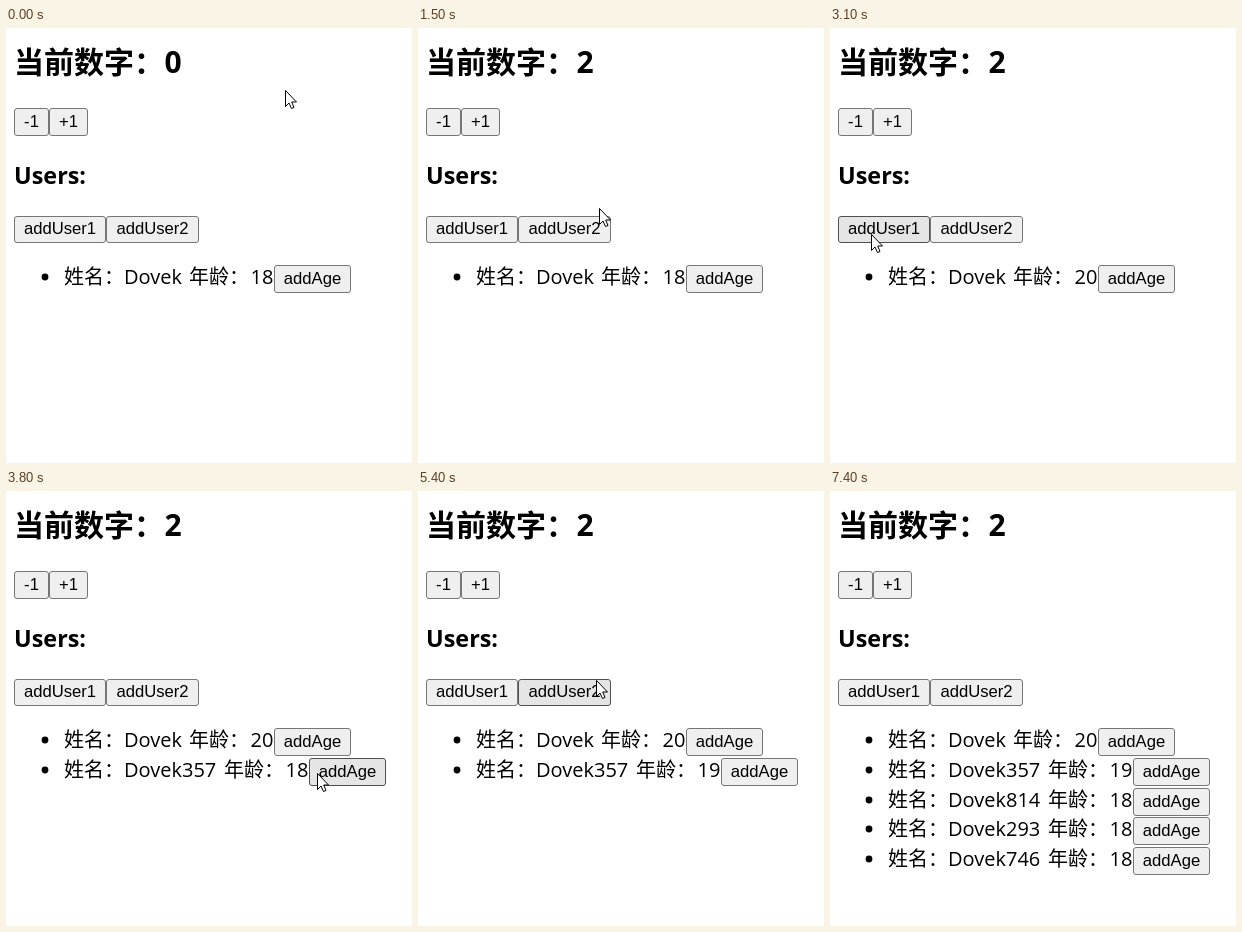
An HTML page that plays this animation: 406x435 px, repeating every 7700 ms.

```html
<!DOCTYPE html>
<html lang="zh-CN">
<head>
<meta charset="utf-8">
<title>Counter and users</title>
<style>
  html, body { margin: 0; width: 100%; height: 100%; overflow: hidden; background: #fff; }
  svg { display: block; font: 20px "Open Sans", "Noto Sans CJK SC", sans-serif; }
  .title { font-size: 30px; font-weight: 700; }
  .subtitle { font-size: 23.4px; font-weight: 700; }
  .button text { font: 16.67px "Liberation Sans", Arial, sans-serif; text-anchor: middle; }
  .button rect { fill: #efefef; stroke: #767676; }
  .button.hover rect { fill: #e5e5e5; stroke: #4f4f4f; }
  .button.pressed rect { fill: #f5f5f5; stroke: #8d8d8d; }
</style>
</head>
<body>
<svg id="stage" width="406" height="435" viewBox="0 0 406 435"></svg>
<script>
const LOOP = 7700, STEP = 100;
const stage = document.getElementById('stage');
const buttons = [];

function add(parent, tag, attrs, content = '') {
  const node = document.createElementNS('http://www.w3.org/2000/svg', tag);
  for (const key in attrs) node.setAttribute(key, attrs[key]);
  node.textContent = content;
  return parent.appendChild(node);
}

const label = (parent, x, y, content, cls = '') => add(parent, 'text', { x, y, class: cls }, content);

function button(parent, x, y, w, h, caption, presses = []) {
  const node = add(parent, 'g', { class: 'button' });
  add(node, 'rect', { x: x + .5, y: y + .5, width: w - 1, height: h - 1, rx: 2.5 });
  label(node, x + w / 2, y + Math.floor(h / 2 + 5), caption);
  const item = { node, x, y, w, h, presses };
  buttons.push(item);
  return item;
}

// Every press shows its effect one step later.
const effects = (item, time) => item.presses.filter(t => t + STEP <= time).length;

label(stage, 8, 45, '当前数字：', 'title');
const count = label(stage, 158.5, 45, '', 'title');
button(stage, 8, 80, 35, 28, '-1');
const plus = button(stage, 43, 80, 39, 28, '+1', [600, 1000]);
label(stage, 8, 156, 'Users:', 'subtitle');
const addUser1 = button(stage, 8, 188, 92, 27, 'addUser1', [3300, 6600]);
button(stage, 100, 188, 93, 27, 'addUser2', [4800, 5000, 5200]);

// batch: how many addUser1 presses it takes for the row to appear
const users = [
  { name: 'Dovek', batch: 0, agePresses: [2100, 2400] },
  { name: 'Dovek357', batch: 1, agePresses: [4000] },
  { name: 'Dovek814', batch: 2 },
  { name: 'Dovek293', batch: 2 },
  { name: 'Dovek746', batch: 2 }
];
users.forEach((user, i) => {
  const y = Math.round(i * 29.75), shift = i ? 35 : 0;
  user.row = add(stage, 'g', {});
  add(user.row, 'circle', { cx: 39, cy: y + 249, r: 3.4 });
  label(user.row, 58, y + 256, '姓名：');
  label(user.row, 118, y + 256, user.name);
  label(user.row, 183 + shift, y + 256, '年龄：');
  user.age = label(user.row, 244.5 + shift, y + 256, '');
  user.addAge = button(user.row, 268 + shift, y + 237, 77, 28, 'addAge', user.agePresses);
});

const cursor = add(stage, 'path', {
  d: 'M.5 .5V16.5L4 13 6.5 18.5 9 17.5 6.7 12H11.5Z', fill: '#fff', stroke: '#000'
});

// Pointer journeys: departure, arrival, destination.
const home = [279, 62];
const moves = [
  [0, 400, 58, 97],
  [1100, 1500, 181, 180],
  [1500, 1900, 300, 244],
  [2500, 3100, 41, 206],
  [3400, 3900, 325, 286],
  [4100, 4500, 155, 220],
  [4500, 4700, 150, 206],
  [4700, 5400, 178, 189],
  [5400, 5700, 210, 170],
  [5700, 6200, 88, 189],
  [7000, 7400, 420, 52]
];

const easeOut = k => Math.sin(Math.min(1, Math.max(0, k)) * Math.PI / 2);

function pointerAt(time) {
  let [x, y] = home;
  for (const [leave, arrive, toX, toY] of moves) {
    const k = easeOut((time - leave) / (arrive - leave));
    x += (toX - x) * k;
    y += (toY - y) * k;
  }
  return [Math.round(x), Math.round(y)];
}

function draw(now) {
  const time = Math.floor(now % LOOP / STEP) * STEP;
  const [px, py] = pointerAt(time);
  cursor.setAttribute('transform', `translate(${px} ${py})`);
  count.textContent = effects(plus, time);
  for (const { row, age, addAge, batch } of users) {
    row.style.display = effects(addUser1, time) >= batch ? '' : 'none';
    age.textContent = 18 + effects(addAge, time);
  }
  for (const { node, x, y, w, h, presses } of buttons) {
    const hover = px >= x && px < x + w && py >= y && py < y + h;
    node.classList.toggle('hover', hover);
    node.classList.toggle('pressed', presses.includes(time));
  }
}

const start = performance.now();
function tick() {
  draw(performance.now() - start);
  requestAnimationFrame(tick);
}
tick();
</script>
</body>
</html>
```
